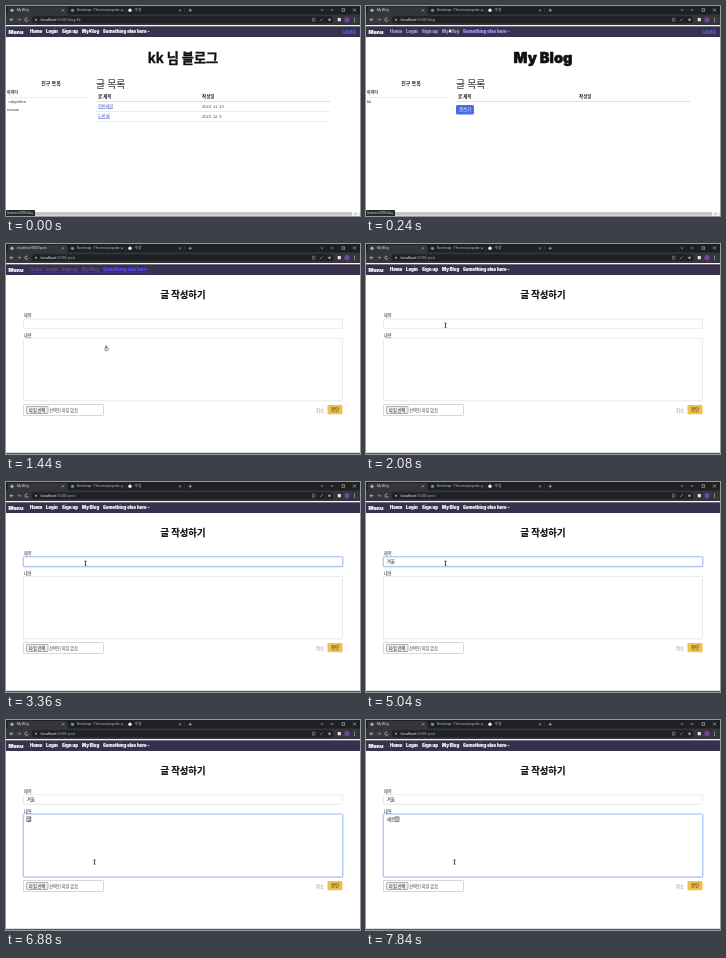
Animation, 354 px wide and 210 px high, one loop 8 s. Source, as an HTML page with a canvas:

```html
<!DOCTYPE html>
<html lang="ko">
<head>
<meta charset="utf-8">
<title>Blog demo</title>
<style>
html, body { margin: 0; width: 100%; height: 100%; overflow: hidden; background: #fff; }
canvas { display: block; width: 354px; height: 210px; }
</style>
</head>
<body>
<canvas id="stage"></canvas>
<script>
const W = 354, H = 210, LOOP = 8000, STEP = 80;
const canvas = document.getElementById('stage');
const ctx = canvas.getContext('2d');
const dpr = window.devicePixelRatio || 1;
canvas.width = W * dpr;
canvas.height = H * dpr;

const KR = '"Noto Sans CJK KR", "Noto Sans CJK JP", "Noto Sans CJK", sans-serif';
const UI = 'Roboto, "Noto Sans CJK KR", sans-serif';
const HEAVY = 'Inter, "Noto Sans CJK KR", sans-serif';
const LOAD_LIST = 80, LOAD_FORM = 1400, FADE = 320;
const FOCUS_TITLE = 2240, FOCUS_BODY = 5840;

const clamp = v => Math.max(0, Math.min(1, v));
const ease = v => v * v * (3 - 2 * v);
const between = (t, a, b) => t >= a && t < b;
const mix = (a, b, k) => `rgb(${a.map((v, i) => Math.round(v + (b[i] - v) * k))})`;

function rect(x, y, w, h, color) {
  ctx.fillStyle = color;
  ctx.fillRect(x, y, w, h);
}

function box(x, y, w, h, r, fill, stroke, line = 0.5) {
  ctx.beginPath();
  ctx.roundRect(x, y, w, h, r);
  if (fill) { ctx.fillStyle = fill; ctx.fill(); }
  if (stroke) { ctx.strokeStyle = stroke; ctx.lineWidth = line; ctx.stroke(); }
}

function dot(x, y, r, color) {
  ctx.beginPath();
  ctx.arc(x, y, r, 0, Math.PI * 2);
  ctx.fillStyle = color;
  ctx.fill();
}

function path(points, color, line = 0.6) {
  ctx.beginPath();
  points.forEach(([x, y], i) => i ? ctx.lineTo(x, y) : ctx.moveTo(x, y));
  ctx.strokeStyle = color;
  ctx.lineWidth = line;
  ctx.stroke();
}

function text(str, x, y, size, color, { font = KR, weight = 400, align = 'left', under = false, fat = 0 } = {}) {
  ctx.font = `${weight} ${size}px ${font}`;
  ctx.textAlign = align;
  ctx.textBaseline = 'alphabetic';
  ctx.fillStyle = color;
  const base = y + size * 0.36;
  ctx.fillText(str, x, base);
  if (fat) {
    ctx.strokeStyle = color;
    ctx.lineWidth = fat;
    ctx.lineJoin = 'round';
    ctx.strokeText(str, x, base);
  }
  const w = ctx.measureText(str).width;
  if (under) rect(x, base + 0.5, w, 0.4, color);
  return w;
}

function cross(x, y, r, color) {
  path([[x - r, y - r], [x + r, y + r]], color, 0.5);
  path([[x + r, y - r], [x - r, y + r]], color, 0.5);
}

function browser(title, url) {
  rect(0, 0, W, 9, '#1f2023');
  box(1.5, 1, 60, 10, 2, '#35363a');
  rect(0, 8.5, W, 10.5, '#35363a');
  rect(0, 19, W, 1.3, '#f4f4f6');

  dot(6, 4.3, 1.6, '#aeb1b6');
  text(title, 11, 4.3, 3.3, '#d5d7da', { font: UI });
  dot(66.5, 4.3, 1.6, '#4b9cb8');
  text('Bootstrap · The most popular', 71, 4.3, 3.3, '#b9bcc1', { font: UI });
  dot(124, 4.3, 1.7, '#f1f1f1');
  text('새 탭', 128.5, 4.3, 3.3, '#b9bcc1', { font: UI });
  for (const x of [57, 116, 174]) cross(x, 4.3, 1, '#d0d2d5');
  rect(119.3, 2.5, 0.4, 4, '#55575c');
  rect(178.3, 2.5, 0.4, 4, '#55575c');
  path([[182.6, 4.3], [185.8, 4.3]], '#d0d2d5');
  path([[184.2, 2.7], [184.2, 5.9]], '#d0d2d5');

  path([[314.6, 3.3], [316, 4.6], [317.4, 3.3]], '#d0d2d5');
  path([[324.8, 4], [327.6, 4]], '#e0e0e0');
  box(336, 2.7, 2.6, 2.6, 0, null, '#e0e0e0');
  cross(348.5, 4, 1.4, '#eee');

  path([[7.4, 13.7], [4, 13.7]], '#eee');
  path([[5.6, 12.1], [4, 13.7], [5.6, 15.3]], '#eee');
  path([[11.4, 13.7], [14.8, 13.7]], '#9b9da1');
  path([[13.2, 12.1], [14.8, 13.7], [13.2, 15.3]], '#9b9da1');
  ctx.beginPath();
  ctx.arc(20.5, 13.7, 1.6, 0.2, 5.4);
  ctx.strokeStyle = '#e5e5e5';
  ctx.lineWidth = 0.6;
  ctx.stroke();
  box(25.5, 10.2, 302, 7, 3.5, '#202124');
  dot(30, 13.7, 1, '#a5a7ab');
  const w = text('localhost', 34.5, 13.7, 3.9, '#e6e7e9', { font: UI });
  text(url, 34.5 + w, 13.7, 3.9, '#9b9ea3', { font: UI });

  box(306.5, 12.2, 2.4, 3, 0.3, null, '#b8babd');
  path([[314, 15], [316.5, 12.4]], '#b8babd');
  dot(323.5, 13.7, 1.2, '#a5a7ab');
  box(331.8, 12, 3, 3.3, 0.4, '#ececec');
  dot(341, 13.7, 2.6, '#7442a8');
  for (const y of [12.1, 13.7, 15.3]) dot(348.6, y, 0.5, '#e0e0e0');
}

function nav(k, logout) {
  rect(0, 20.3, W, 10.7, '#37314e');
  const style = { font: HEAVY, weight: 900, fat: 0.15 };
  const white = [250, 250, 252];
  const link = mix([70, 42, 112], white, k);
  text('Menu', 2.5, 25.7, 5.2, '#fff', style);
  [['Home', 24], ['Login', 40], ['Sign up', 56], ['My Blog', 76]]
    .forEach(([label, x]) => text(label, x, 25.7, 4.25, link, style));
  const drop = mix([62, 48, 235], white, k);
  const w = text('Something else here', 97, 25.7, 4.25, drop, style);
  const x = 98 + w;
  ctx.beginPath();
  ctx.moveTo(x, 25);
  ctx.lineTo(x + 2, 25);
  ctx.lineTo(x + 1, 26.2);
  ctx.fill();
  if (k < 0.3) rect(24, 28, 119, 0.3, drop);
  if (logout) text('Logout', 336.5, 25.7, 4, '#5573ff', { font: HEAVY, weight: 600, under: true });
}

function status(t) {
  rect(0, 205.7, W, 4.3, '#f0f0f0');
  rect(4, 206.2, 342, 3.3, '#c3c3c3');
  path([[349, 207], [350, 207.9], [349, 208.8]], '#666', 0.5);
  if (t < 560) {
    box(0, 204, 29, 6, [0, 1, 0, 0], '#28292c');
    text('localhost:9000/blog', 1, 207, 2.9, '#d5d5d5', { font: UI });
  }
}

function listPage(t) {
  const own = t >= LOAD_LIST + STEP;
  browser('My Blog', own ? ':9000/blog' : ':9000/blog/kk');
  nav(own ? clamp((t - LOAD_LIST) / FADE) : 1, true);
  if (own) text('My Blog', 177, 52, 14.6, '#111', { font: HEAVY, weight: 900, align: 'center', fat: 0.5 });
  else text('kk 님 블로그', 177, 52, 13.2, '#111', { weight: 900, align: 'center', fat: 0.35 });

  text('친구 목록', 45, 76.7, 5, '#222', { weight: 700, align: 'center' });
  text('아이디', 1, 87, 4, '#222', { weight: 700 });
  rect(0, 91.3, 84, 0.5, '#d5d8dc');
  const friends = own ? ['kk'] : ['rubydalen', 'mosun'];
  friends.forEach((name, i) => text(name, i || own ? 1 : 2.5, 96 + i * 8, 4, '#333', { font: UI }));

  text('글 목록', 90, 78.6, 9.8, '#222');
  const dateX = own ? 213 : 196;
  text('글 제목', 92, 90, 4.5, '#222', { weight: 700 });
  text('작성일', dateX, 90, 4.5, '#222', { weight: 700 });
  rect(90, 95, 234, 0.5, '#bfc4ca');
  if (own) {
    const hover = between(t, 1040, LOAD_FORM);
    box(90, 99, 18, 9.6, 1.5, hover ? '#3c58cc' : '#4b6be6');
    text('글쓰기', 99, 103.8, 4.4, '#fff', { align: 'center' });
  } else {
    [['첫번째글', '2023. 11. 23.'], ['두번째', '2023. 12. 5.']].forEach(([name, date], i) => {
      const y = 100.4 + i * 10;
      text(name, 92, y, 4.2, '#5266c4', { under: true });
      text(date, dateX, y, 4, '#444');
      rect(90, y + 5, 234, 0.5, '#d5d8dc');
    });
  }
  status(t);
}

function field(y, h, focus) {
  if (focus > 0) box(17.2, y - 0.3, 319.6, h + 0.6, 1.4, null, `rgba(125, 150, 235, ${0.38 * focus})`, 1.6);
  box(17.5, y, 319, h, 1, '#fff', mix([208, 213, 219], [135, 165, 240], focus), 0.5);
}

// Typed text: each entry is [start, whole string].
function typed(keys, t, x, y, composing) {
  let str = '';
  for (const [at, value] of keys) if (t >= at) str = value;
  if (!str) return;
  const w = text(str, x, y, 4.5, '#222');
  if (!composing) return;
  const last = ctx.measureText(str.slice(-1)).width;
  box(x + w - last, y - 2.3, last, 4.8, 0, null, '#333', 0.45);
}

const titleKeys = [[4400, 'ㄱ'], [4560, '겨'], [4720, '겨ㅇ'], [4800, '겨우'], [4960, '겨울']];
const bodyKeys = [[6480, 'ㅅ'], [6640, '새'], [6800, '샐'], [6960, '새로'], [7360, '새로ㅇ'], [7600, '새로우'], [7760, '새로운']];

function formPage(t) {
  const loading = t < LOAD_FORM + 240;
  browser(loading ? 'localhost:9000/post' : 'My Blog', ':9000/post');
  nav(clamp((t - LOAD_FORM) / FADE), false);
  text('글 작성하기', 177, 50.2, 9.3, '#111', { weight: 900, align: 'center', fat: 0.2 });

  text('제목', 17.8, 71.8, 4.3, '#333');
  field(75, 9.3, t >= FOCUS_TITLE && t < FOCUS_BODY ? 1 : 0);
  typed(titleKeys, t, 20.7, 79.6, t < 5040);
  if (between(t, 3200, 3360)) rect(21, 77, 0.5, 5, '#333');
  if (between(t, 5440, 5600)) rect(29, 77, 0.5, 5, '#333');

  text('내용', 17.8, 91.4, 4.3, '#333');
  field(94.3, 62.5, t >= FOCUS_BODY ? 1 : 0);
  typed(bodyKeys, t, 20.7, 99, true);

  box(17.5, 160.5, 80, 11, 1, '#fff', '#a9aeb8');
  box(20.5, 162.5, 21.5, 7, 0.6, '#efefef', '#666');
  text('파일 선택', 31.2, 166, 4.2, '#222', { align: 'center' });
  text('선택된 파일 없음', 43.2, 166, 4.2, '#444');
  text('취소', 314, 166, 4.4, '#8a8e96', { align: 'center' });
  box(321.5, 161, 15, 9.2, 1.2, '#efc04c');
  text('확인', 329, 165.7, 4.4, '#222', { align: 'center' });
  rect(0, 208.8, W, 1.2, '#55575c');
}

// Pointer legs: [start, end, from, to].
const legs = [
  [320, 1120, [84, 24], [100.5, 104]],
  [1560, 2080, [100.5, 104], [79.5, 81.2]],
  [5520, 5840, [79.5, 81.2], [88.5, 142]]
];

function pointerAt(t) {
  let pos = legs[0][2];
  for (const [a, b, from, to] of legs) {
    if (t < a) break;
    const k = ease(clamp((t - a) / (b - a)));
    pos = from.map((v, i) => v + (to[i] - v) * k);
  }
  return pos;
}

function pointer(t) {
  const [x, y] = pointerAt(t);
  ctx.save();
  ctx.translate(x, y);
  if (t < 400 || between(t, 1040, 1640)) {
    box(-0.8, -2.4, 0.9, 3.2, 0.4, '#fff', '#111', 0.5);
    box(-1.4, -0.2, 3, 2.9, 0.8, '#fff', '#111', 0.5);
  } else if (t < 1040) {
    ctx.beginPath();
    [[-1.2, -2.4], [-1.2, 2], [-0.1, 1.1], [0.6, 2.6], [1.2, 2.3], [0.6, 0.9], [2, 0.8]]
      .forEach(([px, py]) => ctx.lineTo(px, py));
    ctx.closePath();
    ctx.fillStyle = '#fff';
    ctx.fill();
    ctx.strokeStyle = '#111';
    ctx.lineWidth = 0.5;
    ctx.stroke();
  } else {
    path([[-1.2, -2], [1.2, -2]], '#222', 0.7);
    path([[0, -2], [0, 2.2]], '#222', 0.8);
    path([[-1, 2.2], [1, 2.2]], '#222', 0.6);
  }
  ctx.restore();
}

function draw(now) {
  const t = Math.floor((now % LOOP) / STEP) * STEP;
  ctx.setTransform(dpr, 0, 0, dpr, 0, 0);
  rect(0, 0, W, H, '#fff');
  if (t < LOAD_FORM) listPage(t);
  else formPage(t);
  pointer(t);
}

let start;
function tick(now) {
  start ??= now;
  draw(now - start);
  requestAnimationFrame(tick);
}
draw(0);
requestAnimationFrame(tick);
</script>
</body>
</html>
```
